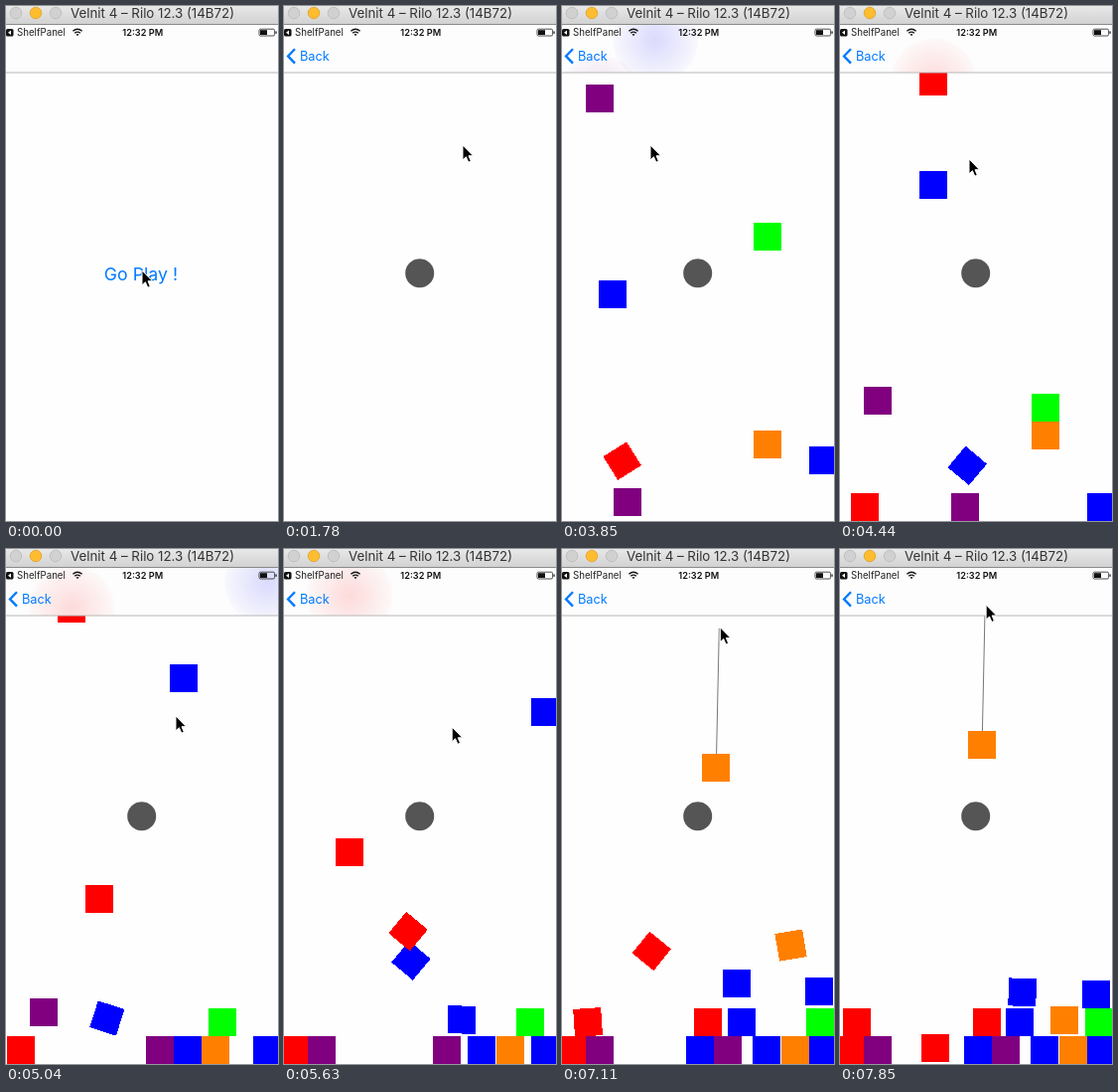
An HTML page for the animation above (7990 ms loop, 274x518 px).

```html
<!DOCTYPE html>
<html lang="en">
<head>
<meta charset="utf-8">
<title>Falling blocks</title>
<style>
  html, body { margin: 0; width: 100%; height: 100%; overflow: hidden; background: #fefefe; }
  svg { display: block; width: 274px; height: 518px; font-family: Inter, "Open Sans", sans-serif; }
  .link { fill: #007aff; }
  #blocks { shape-rendering: crispEdges; }
</style>
</head>
<body>
<svg viewBox="0 0 274 518">
  <defs>
    <linearGradient id="chrome" x2="0" y2="1">
      <stop stop-color="#e8e8e8"/><stop offset="1" stop-color="#d2d2d2"/>
    </linearGradient>
    <clipPath id="navClip"><rect y="19" width="274" height="48"/></clipPath>
  </defs>

  <rect width="274" height="518" fill="#fefefe"/>
  <g id="home">
    <text class="link" x="136" y="275.5" font-size="17.8" text-anchor="middle">Go Play !</text>
  </g>
  <g id="game">
    <rect width="274" height="518" fill="#fefefe"/>
    <line id="rope" stroke="#777" stroke-width="1"/>
    <g id="blocks"></g>
    <circle cx="136.7" cy="268.8" r="14.5" fill="#555"/>
  </g>

  <rect y="19" width="274" height="48" fill="#fdfdfd"/>
  <g id="glows" clip-path="url(#navClip)"></g>
  <rect y="66.5" width="274" height="1" fill="#b8b8b8"/>
  <g id="back">
    <path d="M11 43.2L4 50.4L11 57.6" fill="none" stroke="#007aff" stroke-width="2.3"/>
    <text class="link" x="16" y="55" font-size="12.8">Back</text>
  </g>

  <rect y="23" width="7.5" height="7.5" rx="1.6" fill="#111"/>
  <path d="M5 24.5V29L2 26.8Z" fill="#fff"/>
  <text x="11" y="30" font-size="9.7" fill="#222">ShelfPanel</text>
  <path d="M67.4 25.2Q72 21.2 76.6 25.2M69.2 27.3Q72 25 74.8 27.3" fill="none" stroke="#111" stroke-width="1.4"/>
  <path d="M70.6 28.6Q72 27.6 73.4 28.6L72 30.2Z" fill="#111"/>
  <text x="137.7" y="30" font-size="9.2" font-weight="600" fill="#111" text-anchor="middle">12:32 PM</text>
  <rect x="255" y="23.2" width="15.6" height="6.8" rx="1.4" fill="none" stroke="#222" stroke-width=".8"/>
  <rect x="256" y="24.2" width="7" height="4.8" fill="#111"/>
  <rect x="271.4" y="25.3" width="1.3" height="2.6" rx=".6" fill="#222"/>

  <rect width="274" height="18" fill="url(#chrome)"/>
  <rect y="18" width="274" height="1" fill="#8a8a8a"/>
  <g stroke="#b9b9b9" stroke-width=".8" fill="#d1d1d1">
    <circle cx="10" cy="7" r="5.8"/>
    <circle cx="30" cy="7" r="5.8" fill="#fdbd2f" stroke="#e0a02a"/>
    <circle cx="50" cy="7" r="5.8"/>
  </g>
  <text x="65" y="12" font-size="13.3" fill="#333">Velnit 4 – Rilo 12.3 (14B72)</text>

  <path id="cursor" d="M0 0V14.8L3.4 11.7L5.8 17.2L8.3 16L6 10.7H10.5Z" fill="#000" stroke="#fff" stroke-width="1"/>
</svg>

<script>
const LOOP = 7990, STEP = 148.15;
const G = 731, SIZE = 28, SPAWN_Y = 33, FLOOR = 504, BOUNCE = .46, SLIDE = .5;
const GRAB = 7.07, ROPE = { x: -4, y: 140 };
const colors = { red: '#f00', purple: '#800080', blue: '#00f', orange: '#ff8000', green: '#0f0' };
const $ = id => document.getElementById(id);
const clamp = (v, lo, hi) => Math.min(hi, Math.max(lo, v));

function add(parent, tag, attrs) {
  const el = document.createElementNS('http://www.w3.org/2000/svg', tag);
  for (const name in attrs) el.setAttribute(name, attrs[name]);
  return parent.appendChild(el);
}

for (const name in colors) {
  const grad = add(document.querySelector('defs'), 'radialGradient', { id: 'glow-' + name });
  for (const offset of [0, .5, 1])
    add(grad, 'stop', { offset, 'stop-color': colors[name], 'stop-opacity': .12 * (1 - offset) + .02 });
}

// A block drops in its column onto a stack level, bounces, then slides to its resting x.
const blocks = [];
function drop(color, start, column, endX, level = 0, { slideAt, bounce = BOUNCE } = {}) {
  const restY = FLOOR - SIZE * level;
  const fall = Math.sqrt(2 * (restY - SPAWN_Y) / G);
  blocks.push({
    start, endX, restY, bounce, fall,
    startX: 38 + 28.15 * column,
    slideAt: slideAt ?? start + fall,
    box: add($('blocks'), 'rect', { x: -SIZE / 2, y: -SIZE / 2, width: SIZE, height: SIZE, fill: colors[color] }),
    glow: add($('glows'), 'circle', { r: 43, fill: `url(#glow-${color})` })
  });
}

drop('blue', 1.815, 8, 263);
drop('purple', 2.081, 1, 167.5, 0, { slideAt: 4, bounce: .29 });
drop('red', 2.282, 1, 10, 0, { slideAt: 3.8, bounce: .32 });
drop('orange', 2.51, 6, 235, 0, { slideAt: 4.95 });
drop('blue', 3.013, .45, 206.5, 0, { slideAt: 4.1, bounce: .3 });
drop('green', 3.114, 6, 261, 1, { slideAt: 4.92, bounce: .3 });
drop('purple', 3.447, 0, 38.5, 0, { bounce: .3 });
drop('blue', 3.81, 2, 139.5);
drop('red', 4.103, 2, 148, 1);
drop('blue', 4.522, 5, 181, 1);
drop('red', 4.767, 1, 14, 0, { slideAt: 6.38 });
drop('blue', 5.03, 8, 258, 2);
drop('red', 5.436, 1, 98, 0, { slideAt: 6.4 });
drop('orange', 5.715, 7, 225, 1);
drop('blue', 6.06, 4, 186, 2, { slideAt: 6.5, bounce: .3 });
drop('orange', 6.355, 4, 150.6);
const held = blocks[blocks.length - 1];

// Height above rest, t seconds after landing; each hop is weaker than the last.
function hop(t, speed) {
  while (speed > 8) {
    const time = 2 * speed / G;
    if (t < time) return speed * t - G * t * t / 2;
    t -= time;
    speed /= 4;
  }
  return 0;
}

function place(b, t, below) {
  const age = t - b.start, sliding = t > b.slideAt;
  const height = age < b.fall ? 0 : hop(age - b.fall, b.bounce * G * b.fall);
  const travel = b.endX - b.startX;
  b.x = b.startX + (sliding ? travel * (1 - Math.exp((b.slideAt - t) / SLIDE)) : 0);
  b.y = age < b.fall ? SPAWN_Y + G * age * age / 2 : b.restY - height;
  b.angle = sliding ? clamp(height * travel * .0123, -40, 40) : 0;

  // Ride on top of earlier blocks, easing down past their corners.
  for (const o of below) {
    const overlap = clamp((SIZE - 1 - Math.abs(b.x - o.x)) / 5, 0, 1);
    b.y -= Math.max(0, b.y - (o.y - SIZE)) * overlap;
  }
}

const pointer = [[0, 137, 266], [.14, 137, 267], [.9, 137, 267], [1.6, 180, 140], [1.78, 180, 140],
  [2.815, 160, 140], [3.852, 89, 140], [5.037, 171, 168], [6.37, 167, 193], [GRAB, 160, 80], [7.86, 147, 56]];

function pointerAt(t) {
  const i = Math.max(1, pointer.findIndex(p => p[0] > t));
  const [t0, x0, y0] = pointer[i - 1], [t1, x1, y1] = pointer[i];
  const u = (t - t0) / (t1 - t0);
  return { x: x0 + (x1 - x0) * u, y: y0 + (y1 - y0) * u };
}

const move = (el, x, y, angle = 0) =>
  el.setAttribute('transform', `translate(${x} ${y}) rotate(${angle})`);
const show = (el, on) => el.setAttribute('visibility', on ? 'visible' : 'hidden');

function draw(t) {
  const push = 1 - (1 - clamp((t - .8) / .55, 0, 1)) ** 3;
  move($('home'), -82 * push, 0);
  move($('game'), 274 * (1 - push), 0);
  move($('back'), 80 * (1 - push), 0);
  $('back').setAttribute('opacity', push);

  const tip = pointerAt(t), grabbed = t >= GRAB;
  move($('cursor'), tip.x, tip.y);

  const dropped = [];
  for (const b of blocks) {
    const live = t >= b.start;
    show(b.box, live);
    if (live) {
      place(b, t, dropped);
      if (b === held && grabbed) Object.assign(b, { x: tip.x + ROPE.x, y: tip.y + 1 + ROPE.y, angle: 0 });
      dropped.push(b);
      move(b.box, b.x, b.y, b.angle);
      move(b.glow, b.x, b.y);
    }
    show(b.glow, live && b.y < 110);
  }

  show($('rope'), grabbed);
  if (grabbed) {
    const ends = { x1: tip.x - 1, y1: tip.y + 1, x2: held.x, y2: held.y };
    for (const name in ends) $('rope').setAttribute(name, ends[name]);
  }
}

function tick() {
  const ms = performance.now() % LOOP;
  draw(Math.min(53, Math.floor((ms + 12) / STEP)) * STEP / 1000);
  requestAnimationFrame(tick);
}
tick();
</script>
</body>
</html>
```
